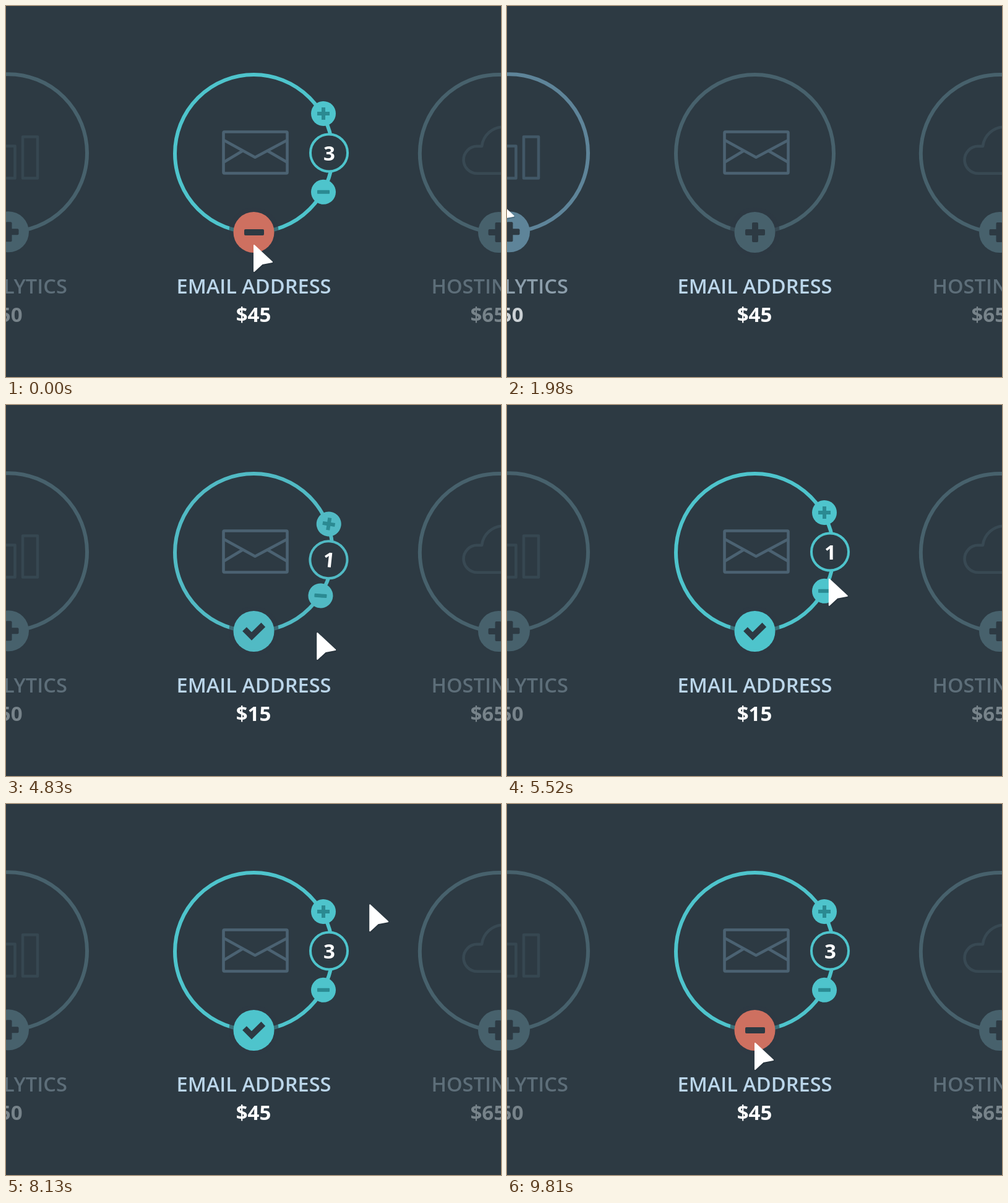
An HTML page for the animation above (9.9 s loop, 800 by 600 pixels).

```html
<!DOCTYPE html>
<html lang="en">
<head>
<meta charset="utf-8">
<title>Service picker</title>
<style>
  html, body { margin: 0; width: 100%; height: 100%; overflow: hidden; background: #2d3a43; }
  svg { display: block; width: 100vw; height: 100vh; }
  text { font-family: "Open Sans", "Noto Sans", sans-serif; font-size: 33px; }
  .label { font-weight: 600; font-size: 32.6px; }
  .bold { font-weight: 700; fill: #fff; }
  .line { fill: none; stroke-width: 4.6; stroke-linejoin: round; }
  .ring { fill: none; stroke-width: 6; }
  .cut { fill: #2d3a43; }
</style>
</head>
<body>
<svg viewBox="0 0 800 600">
  <defs>
    <clipPath id="slot"><rect x="340" y="484" width="120" height="30.5"/></clipPath>
    <g id="plus" class="cut">
      <rect x="-16" y="-5" width="32" height="10" rx="2"/>
      <rect x="-5" y="-16" width="10" height="32" rx="2"/>
    </g>
  </defs>
  <rect width="800" height="600" fill="#2d3a43"/>

  <g id="left">
    <circle class="ring" id="leftRing" cx="3.5" cy="237.7" r="127.5"/>
    <path class="line" id="bars" d="M-14 226.5H14.5V278.5H-14ZM27 211.5H51V278.5H27Z"/>
    <circle id="leftBtn" cx="4" cy="365.3" r="33"/>
    <use href="#plus" x="4.5" y="365.3"/>
    <text class="label" id="leftLabel" x="98.8" y="464.5" text-anchor="end">ANALYTICS</text>
    <text class="bold" id="leftPrice" x="26.5" y="510.5" text-anchor="end">$50</text>
  </g>

  <g id="right">
    <circle class="ring" cx="796.3" cy="238.5" r="127.5" stroke="#47616c"/>
    <path class="line" stroke="#384953" d="M830 270.8H761.5A22 22 0 0 1 761.5 226.8H769A35.5 35.5 0 0 1 804 195.5"/>
    <circle cx="796" cy="366" r="33" fill="#47616c"/>
    <use href="#plus" x="795.5" y="366"/>
    <text class="label" x="687.5" y="464.5" fill="#5d6e79">HOSTING</text>
    <text class="bold" x="750.5" y="510.5" style="fill:#77838a">$65</text>
  </g>

  <circle class="ring" id="ring" cx="400.5" cy="238.5" r="127.5"/>
  <g class="line" stroke="#4b6272">
    <rect x="351.5" y="203.5" width="103" height="67" rx="1.5"/>
    <path d="M352 217L402.500 244.800L454.500 217M352 252.500L382 234.500M454 252.500L423 234.500"/>
  </g>

  <g id="picker">
    <g id="more">
      <circle class="tint" cx="513" cy="174" r="20"/>
      <path fill="#2b8a92" d="M503 171h7v-7h6v7h7v6h-7v7h-6v-7h-7z"/>
    </g>
    <g id="less">
      <circle class="tint" cx="513" cy="300.800" r="20"/>
      <rect x="503" y="297.800" width="20" height="6" rx="1" fill="#2b8a92"/>
    </g>
    <g id="count">
      <circle id="countRing" class="cut" cx="522" cy="237.500" r="30" stroke-width="4"/>
      <g id="digits"></g>
    </g>
  </g>

  <circle class="cut" cx="400.500" cy="366" r="40.300" opacity=".6"/>
  <circle id="btn" cx="400.500" cy="366" r="33"/>
  <g class="cut" transform="translate(401 366)">
    <rect id="hBar" x="-16" y="-5" width="32" height="10" rx="2"/>
    <rect id="vBar" x="-5" y="-16" width="10" height="32" rx="2"/>
    <path id="check" d="M-15.500 -3.500L-4 8L14.800 -10.500" fill="none" stroke="#2d3a43" stroke-width="9.500"/>
  </g>

  <text class="label" x="400.500" y="464.500" text-anchor="middle" fill="#bbd6ea">EMAIL ADDRESS</text>
  <g clip-path="url(#slot)"><g id="prices"></g></g>

  <g id="cursor">
    <path d="M1 1L30 28L14 31L1 43Z" transform="translate(1 2)" fill="#17222a" stroke="#17222a" stroke-width="2" stroke-linejoin="round" opacity=".22"/>
    <path d="M1 1L30 28L14 31L1 43Z" fill="#fff" stroke="#fff" stroke-width="2" stroke-linejoin="round"/>
  </g>
</svg>
<script>
const LOOP = 9900, ROW = 30;
const BASE = [71, 97, 108], HOVER = [94, 132, 153], TEAL = [78, 196, 204], RED = [206, 112, 96];
const $ = id => document.getElementById(id);
const set = (el, o) => { for (const k in o) el.setAttribute(k, o[k]); };

const ramp = (t, a, b) => Math.min(1, Math.max(0, (t - a) / (b - a)));
const sine = p => (1 - Math.cos(Math.PI * p)) / 2;
const quadOut = p => 1 - (1 - p) ** 2;
const cubic = p => p < .5 ? 4 * p ** 3 : 1 - 4 * (1 - p) ** 3;
const expoOut = p => p >= 1 ? 1 : 1 - 2 ** (-10 * p);
const mix = (a, b, p) => a.map((v, i) => v + (b[i] - v) * p);
const rgb = c => `rgb(${c.map(Math.round)})`;

const addText = (parent, text, x, y) => {
  const el = document.createElementNS("http://www.w3.org/2000/svg", "text");
  set(el, { class: "bold", x, y, "text-anchor": "middle" });
  el.textContent = text;
  return $(parent).appendChild(el);
};
const digits = [1, 2, 3].map(n => addText("digits", n, 522.5, 249.5));
const prices = [15, 30, 45].map(n => addText("prices", "$" + n, 400, 510.5));
const tints = document.querySelectorAll(".tint");

// start, end, then two (line) or four (curve) points
const moves = [
  [960, 2220, [400, 386], [379, 489], [215, 445], [-40, 300]],
  [3090, 3870, [825, 410], [403, 377]],
  [4470, 5000, [403, 378], [517, 366.5]],
  [5000, 6080, [517, 366.5], [522, 310], [519, 230], [518, 178]],
  [7590, 8220, [518, 178], [588, 162]],
  [8910, 9700, [588, 162], [400, 386]]
];

function cursorAt(t) {
  const [a, b, ...pts] = moves.filter(m => t >= m[0]).pop() || moves[0];
  const u = cubic(ramp(t, a, b));
  let p = pts;
  while (p.length > 1) p = p.slice(1).map((q, i) => mix(p[i], q, u));
  return p[0];
}

function spin(id, t, angle, lag) {
  const open = t < 420 ? 1
    : t < 3000 ? 1 - expoOut(ramp(t, 420 + lag, 1320 + lag))
    : expoOut(ramp(t, 4470 + lag, 5370 + lag));
  set($(id), { transform: `rotate(${angle * (1 - open)} 400.5 238.5)` });
}

function draw(t) {
  const leaving = t < 3000;
  const on = leaving ? 1 - quadOut(ramp(t, 420, 900)) : quadOut(ramp(t, 4470, 5070));
  const hover = leaving ? 1 - sine(ramp(t, 1080, 1400)) : quadOut(ramp(t, 3640, 3960));
  const red = leaving ? 1 - quadOut(ramp(t, 420, 780)) : quadOut(ramp(t, 9450, 9800));
  const main = mix(mix(BASE, HOVER, hover), TEAL, on);
  const tone = rgb(main);

  set($("ring"), { stroke: tone });
  set($("countRing"), { stroke: tone });
  tints.forEach(el => set(el, { fill: tone }));
  set($("btn"), { fill: rgb(mix(main, RED, red)) });

  const plain = leaving ? ramp(t, 420, 600) : 1 - ramp(t, 4470, 4650);
  const checked = leaving ? 0 : (1 - plain) * (1 - red);
  set($("check"), { opacity: checked });
  set($("hBar"), { opacity: 1 - checked });
  set($("vBar"), { opacity: plain });

  set($("picker"), { opacity: leaving ? 1 - ramp(t, 600, 1000) : ramp(t, 4470, 4620) });
  spin("less", t, 60, 8);
  spin("count", t, 90, 10);
  spin("more", t, 120, 25);
  const press = [6150, 7290].reduce((s, a) => s + Math.sin(Math.PI * ramp(t, a, a + 180)), 0);
  set($("more"), { opacity: 1 - .12 * press });

  const reset = t < 3090;
  const roll = reset ? 2 : sine(ramp(t, 6150, 6690)) + sine(ramp(t, 7290, 7830));
  const digit = reset ? 2 : ramp(t, 6150, 6300) + ramp(t, 7290, 7440);
  prices.forEach((el, i) => set(el, { y: 510.5 + (roll - i) * ROW }));
  digits.forEach((el, i) => set(el, { opacity: Math.max(0, 1 - Math.abs(digit - i)) }));

  const lit = sine(ramp(t, 1680, 1980)) - sine(ramp(t, 2190, 2490));
  const side = rgb(mix(BASE, HOVER, lit));
  set($("leftRing"), { stroke: side });
  set($("leftBtn"), { fill: side });
  set($("bars"), { stroke: rgb(mix([54, 71, 81], [66, 88, 103], lit)) });
  set($("leftLabel"), { fill: rgb(mix([93, 110, 121], [140, 158, 171], lit)) });
  $("leftPrice").style.fill = rgb(mix([119, 131, 138], [203, 209, 213], lit));

  set($("cursor"), { transform: `translate(${cursorAt(t)})` });
}

const begin = performance.now();
function tick() {
  draw((performance.now() - begin) % LOOP);
  requestAnimationFrame(tick);
}
draw(0);
requestAnimationFrame(tick);
</script>
</body>
</html>
```
